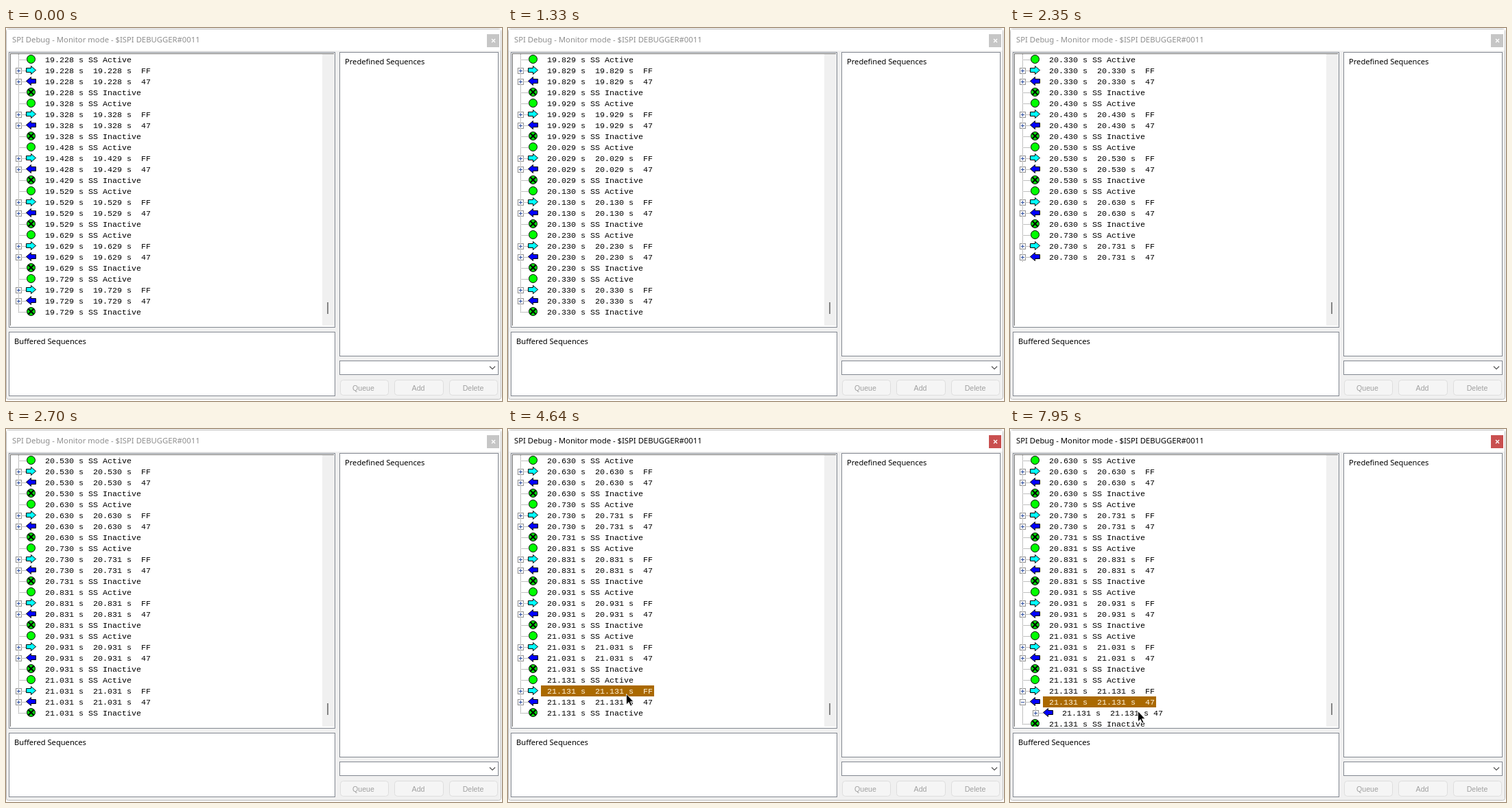
Recreate the animation shown at these times as an HTML page. Size 723x544 px, loop 8000 ms.

```html
<!DOCTYPE html>
<html lang="en">
<head>
<meta charset="utf-8">
<title>SPI Debug</title>
<style>
html, body { margin: 0; width: 100%; height: 100%; overflow: hidden; background: #fff; }
svg { display: block; width: 723px; height: 544px; }
text { white-space: pre; }
.ui { font: 11.15px "Segoe UI", "Open Sans", sans-serif; }
#title { font-size: 11.3px; fill: #8e8e8e; }
.active #title { fill: #000; }
#close { fill: #c6c6c6; }
.active #close { fill: #c94f4f; }
.btn rect { fill: #f5f5f5; stroke: #dedede; }
.btn text { font: 10.6px "Liberation Sans", Arial, sans-serif; fill: #a0a0a0; text-anchor: middle; }
#list text { font: 11.667px "Courier New", "Liberation Mono", monospace; fill: #000; }
#list .sel text { fill: #fff3dc; }
.dots { stroke: #808080; stroke-dasharray: 1 1; shape-rendering: crispEdges; }
.crisp { shape-rendering: crispEdges; }
</style>
</head>
<body>
<svg id="stage" viewBox="0 0 723 544">
  <defs>
    <clipPath id="view"><rect id="window" x="7" y="38" width="454" height="384"/></clipPath>
    <circle id="on" cx="36.5" cy="-.5" r="6" fill="#0f0" stroke="#000"/>
    <g id="off">
      <circle cx="36.5" cy="-.5" r="6" fill="#00d808" stroke="#000"/>
      <path d="M32.5-4.5l8 8m0-8l-8 8" stroke="#000" stroke-width="2"/>
    </g>
    <path id="tx" d="M29.5-3.5h7v-3l7 6l-7 6v-3h-7z" fill="#0ff" stroke="#000"/>
    <path id="rx" d="M43.5-3.5h-7v-3l-7 6l7 6v-3h7z" fill="#00f" stroke="#000"/>
  </defs>

  <rect x=".5" y="1.5" width="721" height="540" rx="3" fill="#f0f0f0" stroke="#bcbcbc"/>
  <rect x="1" y="2" width="720" height="31" fill="#fff"/>
  <text id="title" class="ui" x="9" y="21">SPI Debug - Monitor mode - $ISPI DEBUGGER#0011</text>
  <rect id="close" x="701" y="9" width="18" height="19"/>
  <path d="M708 16l5 5m0-5l-5 5" stroke="#fff" stroke-width="1.3"/>

  <g class="crisp" fill="#fff" stroke="#828790">
    <rect x="4.5" y="35.5" width="475" height="401"/>
    <path d="M6.5 434V37.5H478" fill="none" stroke="#696969"/>
    <rect x="4.5" y="443.5" width="475" height="93"/>
    <rect x="486.5" y="35.5" width="231" height="443"/>
    <rect x="486.5" y="485.5" width="231" height="20"/>
  </g>
  <rect x="461" y="38" width="18" height="396" fill="#f0f0f0"/>
  <rect x="468" y="400" width="2" height="17" fill="#858585"/>
  <path d="M705 493.5l4 4l4-4" fill="none" stroke="#555" stroke-width="1.2"/>
  <text class="ui" x="494" y="53">Predefined Sequences</text>
  <text class="ui" x="12" y="461">Buffered Sequences</text>
  <g class="btn">
    <rect x="487.5" y="513.5" width="70" height="22" rx="4"/><text x="521" y="529">Queue</text>
    <rect x="566.5" y="513.5" width="71" height="22" rx="4"/><text x="601" y="529">Add</text>
    <rect x="646.5" y="513.5" width="70" height="22" rx="4"/><text x="681" y="529">Delete</text>
  </g>

  <path id="trunk" class="dots"/>
  <g clip-path="url(#view)">
    <g id="list"><rect id="mark" x="48" width="165" height="16" fill="#aa6900"/></g>
  </g>
  <circle id="press" r="11.5" fill="#e6d400" opacity=".75"/>
  <path id="cursor" d="M.5.5v15.5l3.6-3.5l2.6 5.4l2.2-1l-2.5-5.2h4.6z" fill="#000" stroke="#fff" stroke-width=".8"/>
</svg>
<script>
const LOOP = 8000, ROW = 16, GROUPS = 20, SHOWN = 24;
const $ = id => document.getElementById(id);
const list = $('list');

// Per group from the seventh on: scroll begins, [scroll ends,] new rows painted
const arrivals = [
  [100, 160], [300, 400, 560], [720, 770], [910, 970, 1030], [1110, 1170], [1270, 1330],
  [1520, 1580], [1720, 1770, 1820], [1880, 1930, 1980], [2080, 2140],
  [2290, 2340, 2390], [2450, 2500, 2550], [2640, 2700], [2850, 2890]
];
const path = [
  [3460, 4, 400], [3700, 70, 395], [3950, 138, 388], [4210, 169, 384], [4450, 169, 384],
  [4640, 172, 386], [5020, 179, 396], [5130, 179, 397], [5230, 181, 399],
  [7200, 181, 399], [7400, 182, 398], [7780, 182, 398], [7950, 186, 411]
];
const presses = [[4280, 4430], [5940, 6080], [6490, 6590], [6940, 7200]];
const PICK_TX = 4280, PICK_RX = 5940, EXPAND = 7200;

const stamp = ms => (ms / 1000).toFixed(3) + ' s';

function addRow(y, icon, label, x = 0) {
  const g = document.createElementNS('http://www.w3.org/2000/svg', 'g');
  const box = icon === 'tx' || icon === 'rx';
  g.setAttribute('transform', `translate(${x} ${y})`);
  g.innerHTML = '<path class="dots" d="M18 .5H29"/>' +
    (box ? '<rect class="crisp" x="14.5" y="-3.5" width="8" height="8" fill="#fff" stroke="#919191"/>' +
      '<path class="crisp" d="M16 .5h5" stroke="#3050a0"/>' +
      '<path class="crisp plus" d="M18.5-2v5" stroke="#3050a0"/>' : '') +
    `<use href="#${icon}"/><text x="57" y="4">${label}</text>`;
  list.append(g);
  return g;
}

const rows = [];
for (let k = 0; k < GROUPS; k++) {
  const start = 19228 + 100 * k + (k >= 3) + (k >= 9) + (k >= 16);
  const end = start + (k === 2 || k === 15);
  const span = stamp(start) + '  ' + stamp(end);
  [['on', stamp(start) + ' SS Active'], ['tx', span + '  FF'],
   ['rx', span + '  47'], ['off', stamp(end) + ' SS Inactive']]
    .forEach(([icon, label]) => rows.push(addRow(46 + rows.length * ROW, icon, label)));
}
const last = rows.length - 1, txRow = rows[last - 2], rxRow = rows[last - 1], endRow = rows[last];
const child = addRow(46 + last * ROW, 'rx', '21.131 s  21.131 s 47', 19);
child.insertAdjacentHTML('afterbegin', '<path class="dots" d="M18.5-8V0"/>');

const show = (el, on) => el.setAttribute('visibility', on ? 'visible' : 'hidden');

// First row in view, and how many rows are painted
function scrollAt(t) {
  let top = 0, count = SHOWN;
  arrivals.forEach((a, i) => {
    if (t < a[0]) return;
    const full = 4 * (i + 1);
    const painted = t >= a[a.length - 1];
    top = painted || (a.length > 2 && t >= a[1]) ? full : full - 1;
    count = painted ? SHOWN : full + 19 - top;
  });
  return [top, count];
}

function cursorAt(t) {
  const i = path.findIndex(p => p[0] > t);
  if (i < 0) return path[path.length - 1].slice(1);
  const a = path[i - 1], b = path[i], f = (t - a[0]) / (b[0] - a[0]);
  return [1, 2].map(n => Math.round(a[n] + (b[n] - a[n]) * f));
}

function draw(t) {
  const [top, count] = scrollAt(t);
  const open = t >= EXPAND, extra = open ? ROW : 0;
  list.setAttribute('transform', `translate(0 ${-top * ROW})`);
  $('window').setAttribute('height', Math.min(396, count * ROW + extra));
  const foot = 38 + count * ROW + extra - (count === SHOWN ? 8 : 0);
  $('trunk').setAttribute('d', `M18.5 38V${foot}`);

  show(child, open);
  show(rxRow.querySelector('.plus'), !open);
  endRow.setAttribute('transform', `translate(0 ${46 + last * ROW + extra})`);

  const onRx = t >= PICK_RX, onTx = t >= PICK_TX && !onRx;
  txRow.classList.toggle('sel', onTx);
  rxRow.classList.toggle('sel', onRx);
  show($('mark'), onTx || onRx);
  $('mark').setAttribute('y', 38 + (last - (onRx ? 1 : 2)) * ROW);
  $('stage').classList.toggle('active', t >= PICK_TX);

  const visible = t >= path[0][0];
  show($('cursor'), visible);
  show($('press'), presses.some(([a, b]) => t >= a && t < b));
  if (visible) {
    const at = `translate(${cursorAt(t)})`;
    $('cursor').setAttribute('transform', at);
    $('press').setAttribute('transform', at);
  }
}

function tick() {
  draw(performance.now() % LOOP);
  requestAnimationFrame(tick);
}
tick();
</script>
</body>
</html>
```
